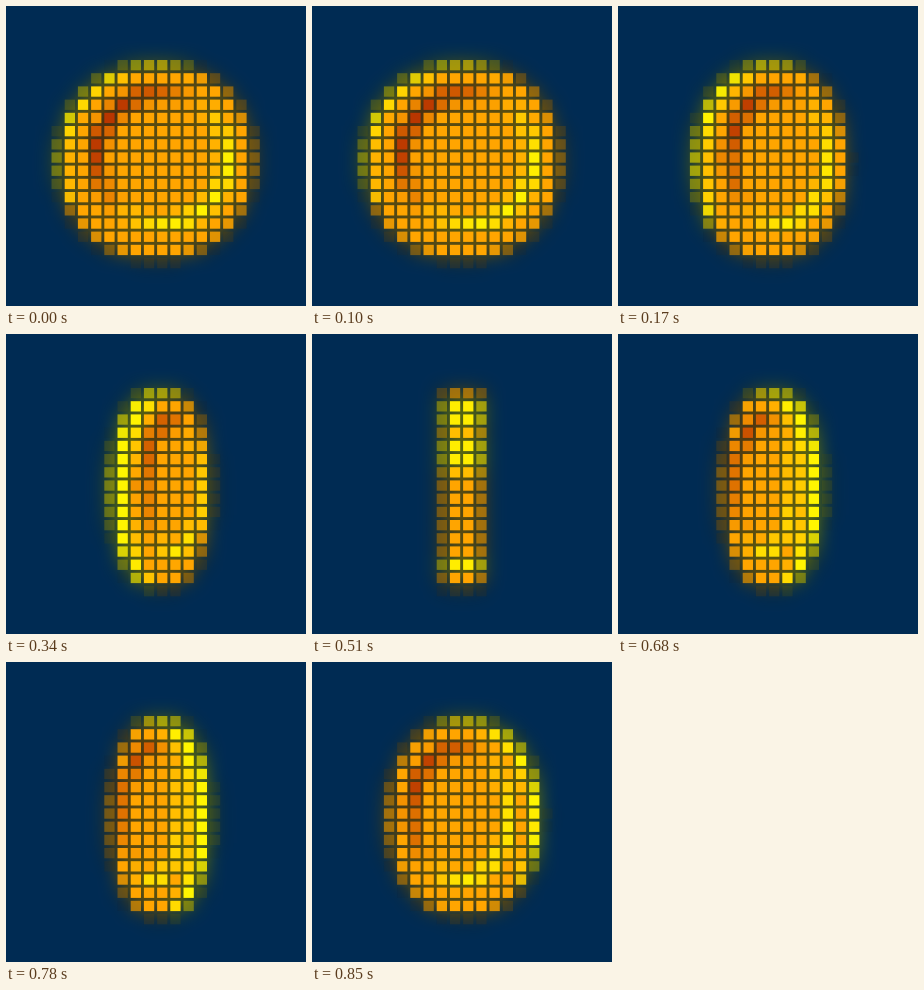
Recreate the animation shown at these times as an HTML page. Size 300 by 300 pixels, loop 1.02 s.

```html
<!DOCTYPE html>
<html lang="en">
<head>
<meta charset="utf-8">
<title>Spinning pixel coin</title>
<style>
html, body { margin: 0; width: 100%; height: 100%; overflow: hidden; background: #002b53; }
svg { display: block; width: 100vw; height: 100vh; }
</style>
</head>
<body>
<svg viewBox="0 0 300 300">
  <defs>
    <filter id="halo" filterUnits="userSpaceOnUse" x="0" y="0" width="300" height="300" color-interpolation-filters="sRGB">
      <feGaussianBlur stdDeviation="8.5"/>
      <feColorMatrix values=".41 0 0 0 0  0 .49 0 0 0  0 0 1 0 .02  0 0 0 1.4 0"/>
    </filter>
  </defs>
  <rect width="300" height="300" fill="#002b53"/>
  <use href="#coin" filter="url(#halo)"/>
  <g id="coin"></g>
</svg>
<script>
const STEP = 170, N = 16, PITCH = 13.2, SIZE = 10.3, SUB = 6;
const LEFT = 45.5, TOP = 54, CY = 155.3, R = 98;
const ORANGE = [255, 165, 0], YELLOW = [255, 245, 0], DARK = [180, 45, 0];

// centre, face half-width, half thickness, side the face leans to
const POSES = [
  { mid: 150, face: 95, edge: 4, side: 1 },
  { mid: 152.5, face: 71, edge: 6.5, side: 1 },
  { mid: 154.5, face: 41, edge: 10, side: 1 },
  { mid: 150, face: 0, edge: 21, side: 0 },
  { mid: 154.5, face: 41, edge: 10, side: -1 },
  { mid: 152.5, face: 71, edge: 6.5, side: -1 }
];

const clamp = v => Math.max(0, Math.min(1, v));
const mix = (a, b, k) => a.map((v, i) => v + (b[i] - v) * k);
const chord = v => Math.max(0, 1 - Math.abs(v) ** 2.1) ** (1 / 2.1);

function edgeColor(y) {
  const lit = (y > 66 && y < 93) || (y > 105 && y < 132) || (y > 224 && y < 237);
  return mix(ORANGE, YELLOW, lit ? .9 : y > 92 && y < 146 ? .3 : 0);
}

function shade(x, y, { mid, face, edge, side }) {
  const v = (y - CY) / R;
  if (Math.abs(v) > 1 || Math.abs(x - mid) > edge + face * chord(v)) return null;
  if (!face) return edgeColor(y);
  const cx = mid + edge * side, lean = (x - cx) * side;
  if (Math.abs(lean) > face * chord((y - CY - 6) / R)) {
    const lit = lean < 0 ? y < CY + 10 * edge : y < CY && lean < face * .35;
    return lit ? YELLOW : ORANGE;
  }
  // engraved ring: shadow at upper left, light at lower right
  const p = (x - cx - 2) / (face * .69), q = (y - 152) / 66;
  if (Math.abs(Math.hypot(p, q) - 1) > .11) return ORANGE;
  const light = p + .8 * q;
  if (light > 0) return mix(ORANGE, YELLOW, clamp(.25 + .7 * light));
  return mix(ORANGE, DARK, clamp((-1.2 * p - .8 * q - .1) * .75));
}

function cellLook(cx, cy, pose) {
  const sum = [0, 0, 0], at = k => ((k + .5) / SUB - .5) * PITCH;
  let hits = 0;
  for (let i = 0; i < SUB; i++) {
    for (let j = 0; j < SUB; j++) {
      const c = shade(cx + at(i), cy + at(j), pose);
      if (!c) continue;
      hits++;
      c.forEach((v, n) => sum[n] += v);
    }
  }
  const cover = hits / (SUB * SUB);
  // thin coverage also darkens the cell
  const tone = Math.sqrt(cover) / (hits || 1);
  return { fill: `rgb(${sum.map(v => Math.round(v * tone))})`, opacity: cover ** .8 };
}

const coin = document.getElementById("coin");
const cells = [];
for (let row = 0; row < N; row++) {
  for (let col = 0; col < N; col++) {
    const x = LEFT + PITCH * col, y = TOP + PITCH * row;
    const el = document.createElementNS("http://www.w3.org/2000/svg", "rect");
    const attrs = { x, y, width: SIZE, height: SIZE };
    for (const k in attrs) el.setAttribute(k, attrs[k]);
    coin.append(el);
    cells.push({ el, looks: POSES.map(p => cellLook(x + SIZE / 2, y + SIZE / 2, p)) });
  }
}

let shown = -1;
function draw(t) {
  const pose = Math.floor(t / STEP) % POSES.length;
  if (pose === shown) return;
  shown = pose;
  for (const { el, looks } of cells) {
    el.setAttribute("fill", looks[pose].fill);
    el.setAttribute("opacity", looks[pose].opacity);
  }
}

draw(0);
const start = performance.now();
function tick() {
  draw(performance.now() - start);
  requestAnimationFrame(tick);
}
requestAnimationFrame(tick);
</script>
</body>
</html>
```
